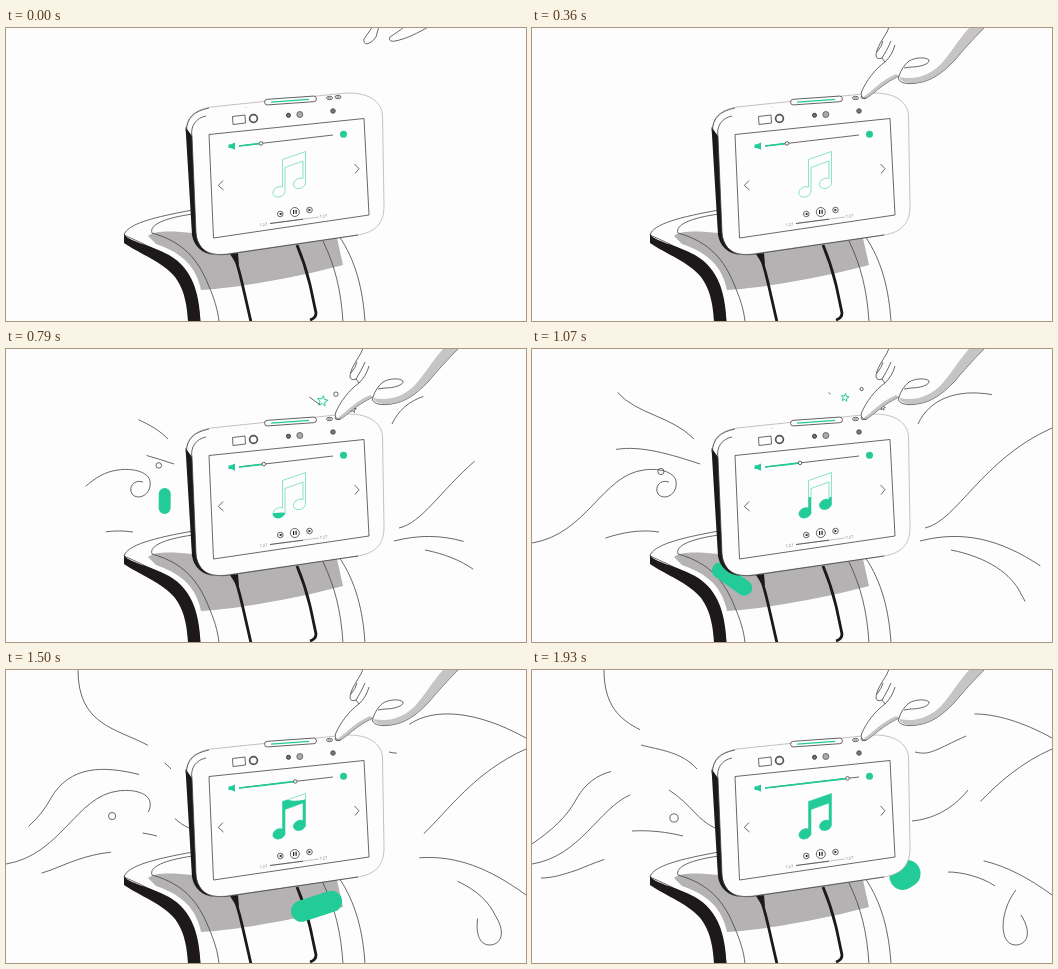
Animation of 520x293 px, one loop 2000 ms. Source, as an HTML page:

```html
<!DOCTYPE html>
<html lang="en">
<head>
<meta charset="utf-8">
<title>Smart display volume</title>
<style>
  html, body { margin: 0; width: 100%; height: 100%; overflow: hidden; background: #fefdfe; }
  svg { display: block; width: 100vw; height: 100vh; }
  .ln, .face { fill: none; stroke: #454345; stroke-width: .8; }
  .face { fill: #fefdfe; }
  .ink { fill: #1d191b; }
  .grey { fill: #b4b2b3; }
  .thin { fill: none; stroke: #aaa; stroke-width: .7; }
  .green { fill: #22cb98; }
  .gl { fill: none; stroke: #22cb98; }
  text { font: 4px Inter, Arial, sans-serif; fill: #888; }
</style>
</head>
<body>
<svg viewBox="0 0 520 293" preserveAspectRatio="none">
  <defs>
    <path id="note" d="M276.5 131.500L299.500 123.500V153A6.400 5 -25 1 1 297 150.500V133L279 139.500V161.500A6.400 5 -25 1 1 276.500 159Z"/>
    <clipPath id="level"><path id="fill"/></clipPath>
  </defs>

  <g id="trails" class="ln"></g>
  <circle id="bubble" class="ln"/>

  <!-- stand -->
  <path class="face" d="M118 207C121 196 148 189 187 182L333 208C350 233 357 262 359 294H194C190 240 165 228 118 207Z"/>
  <path class="grey" d="M142 208C148 202 168 203 187 205L331 210L337 237C300 247 240 259 195 262C190 238 176 225 150 216Z"/>
  <path class="ln" d="M187 186C158 190 143 197 146 205C178 214 192 232 202 256C208 270 212 282 213 294M317 213C329 238 335 262 337 294"/>
  <path class="ink" d="M118 206C121 213 145 217 163 227C184 239 193 260 194.500 294H182C181 276 178 261 169 249C157 234 134 226 118 215Z"/>
  <path d="M227 225C232 236 234 246 237 259L245 294M291 217C299 236 303 251 306 266L310 285Q310 290 304 292" fill="none" stroke="#1d191b" stroke-width="2.800"/>
  <path class="ink" d="M224 226L232 225L233 237L229 234Z"/>

  <rect id="blob" class="green"/>

  <!-- display -->
  <path class="thin" style="fill:#fefdfe" d="M181 101C181 87 190 82 205 79L335 65.500C356 63 375 70 376.500 87L378 178C378 195 370 204 352 207L220 226C202 228 190 223 187 208Z"/>
  <path class="ink" d="M179.500 99L186 108L190 204C191 217 199 225 209 227C196 226 188 218 186 207Z"/>
  <path class="ln" d="M186 109C184 98 190 90 200 88M180 103C181 90 188 83 203 80M352 207L220 226.500C202 228 191 221 190 205L186 109"/>
  <path class="gl" d="M226 76l1 .8M234 75l1 1M239 79l2 .5" stroke-width=".6" opacity=".5"/>
  <g transform="rotate(-4 284.500 72.500)">
    <rect class="face" x="258.500" y="69.700" width="52" height="5.600" rx="2.800"/>
    <path class="gl" d="M265 72.700H303" stroke-width="1.300"/>
  </g>
  <ellipse class="face" cx="323.500" cy="70" rx="3" ry="1.700"/>
  <ellipse class="face" cx="332" cy="69" rx="3" ry="1.700"/>
  <path class="ln" d="M322 70h3M330.500 69h3M226.500 88.500L239 87L239.500 95L227 96.500Z"/>
  <circle cx="247.500" cy="90.500" r="3.900" fill="#fefdfe" stroke="#555" stroke-width="1.700"/>
  <circle cx="282.500" cy="87.300" r="2" fill="#777" stroke="#333"/>
  <circle cx="293.800" cy="86.500" r="3" fill="#aaa" stroke="#555" stroke-width=".8"/>
  <circle cx="327" cy="83" r="2.300" fill="#777" stroke="#444" stroke-width=".8"/>

  <!-- player -->
  <path class="face" d="M203 106.500L358 90.500L363 187L207.500 210Z"/>
  <path class="green" d="M222.500 116.500L225 116.300L229 114.500V121.800L225 120L222.500 120Z"/>
  <path class="ln" d="M233 118L327 107"/>
  <path id="volume" class="gl" stroke-width="1.700"/>
  <circle id="knob" class="face" r="1.800"/>
  <circle class="green" cx="337.500" cy="106.300" r="3.500"/>
  <path class="ln" d="M217 152.500L212.300 157.500L217.500 162M348.500 136L353 140.700L349 145.500"/>
  <use href="#note" class="gl" stroke-width=".7" opacity=".75"/>
  <use href="#note" class="green" clip-path="url(#level)"/>
  <circle class="ln" cx="274.300" cy="186" r="2.800"/>
  <circle class="ln" cx="288.800" cy="184" r="4.500"/>
  <circle class="ln" cx="303.500" cy="182" r="2.800"/>
  <path class="ink" d="M273 186l2.500-1.500v3zM305 182l-2.500-1.500v3zM287 182h1.200v4h-1.200zM289.500 181.800h1.200v4h-1.200z"/>
  <path class="thin" d="M264 195.500L313 189"/>
  <path class="ln" d="M264 195.500L297 191.200"/>
  <text transform="translate(254 198.500) rotate(-7)">1:27</text>
  <text transform="translate(314 190) rotate(-7)">1:27</text>

  <g id="sparks"></g>

  <!-- hand -->
  <path id="reach" class="face" d="M367 -2L358 11Q357 15 361 16Q366 15 370 9L373 -2M399 -2C394 3 388 6 384 9C382 12 385 14 389 13C400 11 412 5 424 -2"/>
  <g id="press">
    <path class="face" stroke-linejoin="round" d="M374 -50C366 -22 360 -8 355 4C349 14 344 21 344 28Q345 32 350 30L353 34C343 41 334 53 329.500 64Q328 70 334 70C341 67 348 57 367 48C364 54 374 57 385 55C400 53 410 45 422 33C432 21 441 11 452 0L510 -50Z"/>
    <path class="grey" opacity=".75" d="M367 49C386 53 400 45 409 36C419 25 426 12 437 0H452C441 11 432 21 422 33C410 45 400 53 385 55Q369 56 367 49Z"/>
    <path class="grey" opacity=".75" d="M331 69.500C340 63 350 52 364 46L367 48C348 57 341 67 334 70Z"/>
    <path class="ln" d="M350 30C353 25 356 20 359 13M353 34C358 29 361 24 363 17M367 48C369 42 372 37 377 33C384 29 394 29 397 32C398 36 388 39 379 39L372 40M345 24Q350 18 351 13"/>
  </g>
</svg>
<script>
const LOOP = 2000, STEPS = 28;
const $ = id => document.getElementById(id);
const set = (el, attrs) => { for (const k in attrs) el.setAttribute(k, attrs[k]); };
const show = (el, on) => { el.style.display = on ? "" : "none"; };

function make(tag, attrs, parent) {
  const el = document.createElementNS("http://www.w3.org/2000/svg", tag);
  set(el, attrs);
  if (parent) parent.append(el);
  return el;
}

// Progress from 0 to 1 over a span of steps.
const ramp = (step, start, span) => Math.min(1, Math.max(0, (step - start) / span));
const easeOut = (u, power) => 1 - (1 - u) ** power;

// Strokes flying off the display: path, first step, steps until fully drawn.
const trails = [
  ["M162 90C130 57 72 68 72 0", 8.4, 10],
  ["M168 115C120 99 70 85 45 128C35 147 20 160 0 174", 9, 14],
  ["M137 133C128 130 122 138 126 145C132 152 146 146 144 132C142 122 125 119 112 121C70 126 55 185 0 194", 6, 9],
  ["M127 183C95 178 65 192 45 200C30 205 20 208 9 208", 7, 18],
  ["M386 75C403 38 455 32 520 68", 7, 14],
  ["M393 179C425 172 450 110 520 79", 6, 8],
  ["M388 192C435 180 475 192 520 225", 6, 10],
  ["M419 201C455 208 480 225 489 245C500 262 496 275 483 275C466 274 468 240 484 220", 6, 18],
  ["M165 99C150 82 128 80 109 75", 20, 7],
  ["M183 158C165 150 160 135 137 120", 19, 7],
  ["M151 166C135 162 118 160 100 161", 19, 7],
  ["M416 202C430 202 450 207 463 216", 21, 6],
  ["M383 82C398 86 405 79 434 66", 20, 7],
  ["M380 151C400 149 420 140 436 120", 23, 4]
].map(([d, start, span]) => ({ el: make("path", { d, pathLength: 100 }, $("trails")), start, span }));

function drawTrail({ el, start, span }, step) {
  const head = 100 * ramp(step, start, span);
  const tail = 100 * ramp(step, Math.max(17, start + 8), 22);
  show(el, head > tail);
  set(el, { "stroke-dasharray": `${head - tail} 300`, "stroke-dashoffset": -tail });
}

function star(r) {
  const points = Array.from({ length: 10 }, (_, i) => {
    const a = i * Math.PI / 5 - 1.4, q = i % 2 ? r * .45 : r;
    return `${q * Math.cos(a)} ${q * Math.sin(a)}`;
  });
  return `M${points.join("L")}Z`;
}
const ring = r => `M${-r} 0A${r} ${r} 0 1 1 ${r} 0A${r} ${r} 0 1 1 ${-r} 0Z`;
const streak = r => `M0 0L${11 * r ** 6} ${8 * r ** 6}`;

const sparks = [
  { css: "gl", shape: star, size: 5.5, angle: -136, reach: 25 },
  { css: "ln", shape: star, size: 3.5, angle: -20, reach: 21 },
  { css: "ln", shape: ring, size: 2.2, angle: -93, reach: 26 },
  { css: "ln", shape: streak, size: 1, angle: -147, reach: 41 }
].map(s => ({ ...s, el: make("path", { class: s.css }, $("sparks")) }));

function drawSpark({ el, shape, size, angle, reach }, step) {
  const far = reach * easeOut(ramp(step, 6, 9), 2), a = angle * Math.PI / 180;
  const r = size * Math.sqrt(1 - ramp(step, 11, 9));
  show(el, step > 6 && r > .05);
  set(el, { d: shape(r), transform: `translate(${331 + far * Math.cos(a)} ${66 + far * Math.sin(a)})` });
}

const blobPath = make("path", { d: "M163 128C145 175 185 245 248 246C295 247 340 228 373 205" });
const bubblePath = make("path", { d: "M165 115C100 120 80 160 142 148" });
const along = (path, u) => path.getPointAtLength(u * path.getTotalLength());

// The blob stretches along its way and thickens as it travels.
function drawBlob(step) {
  const u = ramp(step, 10, 17), way = easeOut(u, 1.4), grow = ramp(step, 9, 2);
  const { x, y } = along(blobPath, way);
  const p = along(blobPath, way - .02), q = along(blobPath, way + .02);
  const turn = Math.atan2(q.y - p.y, q.x - p.x) * 180 / Math.PI;
  const a = grow * (10 + 6 * u + 14 * Math.sin(Math.PI * u)), b = grow * (5.5 + 8 * u);
  set($("blob"), { x: x - a, y: y - b, width: 2 * a, height: 2 * b,
    rx: Math.min(a, b), transform: `rotate(${turn} ${x} ${y})` });
}

function drawBubble(step) {
  const u = ramp(step, 9, 18), { x, y } = along(bubblePath, u);
  set($("bubble"), { cx: x, cy: y, r: ramp(step, 7, 3) * (2.6 + 1.5 * u) });
}

function drawPlayer(step) {
  const u = ramp(step, 9, 18);
  const x = 255 + 60.5 * u ** 1.4, y = 118 - (x - 233) * 11 / 94;
  set($("volume"), { d: `M233 118L${x} ${y}` });
  set($("knob"), { cx: x, cy: y });
  const top = 172 - 53 * easeOut(u, 1.5);
  set($("fill"), { d: `M260 ${top + 2}Q275 ${top - 1} 284 ${top + 1}T305 ${top - 2}V175H260Z` });
}

function drawHand(step) {
  const away = Math.max(0, 4 - step);
  show($("reach"), step < 1);
  show($("press"), step >= 1);
  set($("press"), { transform: `translate(${6 * away} ${-12.5 * away})` });
}

function frame() {
  const t = performance.now() % LOOP;
  let step = Math.min(STEPS - 1, Math.floor((t + 5) * STEPS / LOOP));
  if (step === 24) step = 23; // short hold
  trails.forEach(trail => drawTrail(trail, step));
  sparks.forEach(spark => drawSpark(spark, step));
  [drawBlob, drawBubble, drawPlayer, drawHand].forEach(part => part(step));
  requestAnimationFrame(frame);
}
frame();
</script>
</body>
</html>
```
